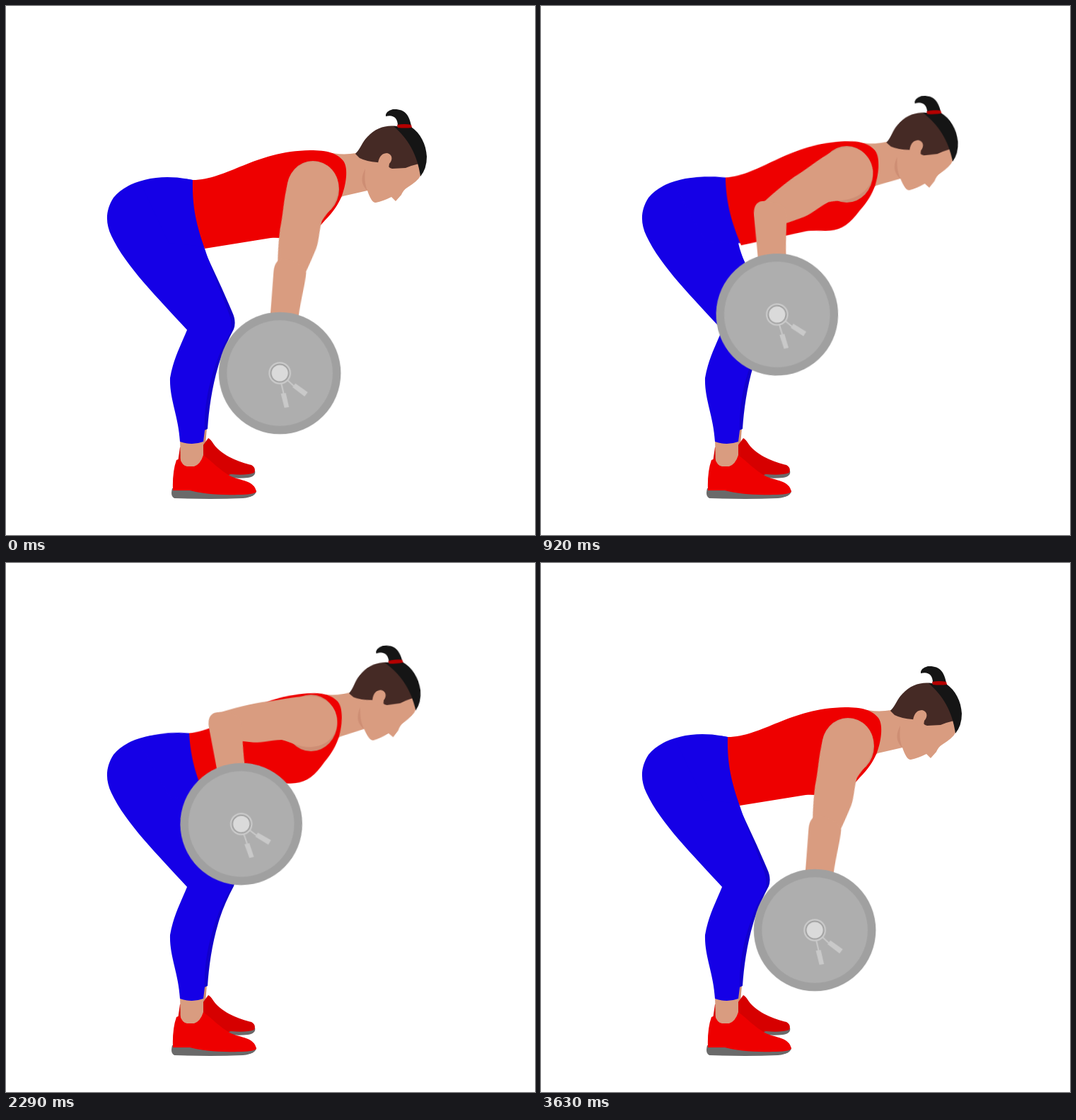
An HTML page for the animation above (3.67 s loop, 748 by 748 pixels).

```html
<!DOCTYPE html>
<html lang="en">
<head>
<meta charset="utf-8">
<title>Bent-over row</title>
<style>
  html, body { margin: 0; width: 100%; height: 100%; overflow: hidden; background: #fff; }
  svg { display: block; width: 100vw; height: 100vh; }

  .skin { fill: #d99c80; }
  .shade { fill: #ce8e74; }
  .red { fill: #ee0000; }
  .darkred { fill: #d60000; }
  .blue { fill: #1500e6; }
  .darkblue { fill: #1200cb; }
  .sole { fill: #6a6a6a; }
  .brown { fill: #452a25; }
  .black { fill: #151515; }
  .clip { fill: #c9c9c9; }
  .rod { fill: none; stroke: #c9c9c9; stroke-width: 2; }

  /* every joint shares one lift-and-lower cycle */
  .joint { animation: row 3670ms infinite; }
  @keyframes row {
    0%, 2.72% { transform: var(--low); animation-timing-function: cubic-bezier(.35, 0, .45, 1); }
    50% { transform: var(--high); animation-timing-function: cubic-bezier(.55, 0, .65, 1); }
    97.28%, 100% { transform: var(--low); }
  }
  .torso { transform-origin: 197px 303px; --low: rotate(0deg); --high: rotate(-5.3deg); }
  .shoulder { --low: translate(434px, 257px); --high: translate(431px, 221px); }
  .upper { --low: rotate(15.8deg); --high: rotate(96deg); }
  .fore { --low: translate(0, 123px) rotate(-10.5deg); --high: translate(0, 123px) rotate(-107.2deg); }
  .plate { --low: translate(0, 144.4px) rotate(-5.3deg); --high: translate(0, 144.4px) rotate(4.7deg); }
</style>
</head>
<body>
<svg viewBox="0 0 748 748">
  <!-- far leg -->
  <path class="shade" d="M276 596H284L282 622H274Z"/>
  <path class="sole" d="M300 660Q330 664 352 657Q354 665 342 667Q325 669 310 666Z"/>
  <path class="darkred" d="M246 624L243 645L290 672L318 662Q340 664 351 660Q354 653 347 649C330 645 306 636 294 620Q289 612 286 611L278 622Z"/>
  <path class="darkblue" d="M279 342C292 371 308 404 320 433Q326 446 322 457C314 472 307 487 302 503C291 538 287 570 285 598L278 601L260 500Z"/>

  <!-- near leg -->
  <path class="skin" d="M246 612H279L279 645Q270 656 247 652Z"/>
  <path class="sole" d="M235 682Q232 693 238 696Q290 698 335 696Q354 694 354 685Z"/>
  <path class="red" d="M241 642L246 640Q249 650 256 651H266Q275 648 279 635C291 644 303 657 318 665C331 671 352 671 354 687Q350 691 328 691C300 692 275 689 260 685H236Q235 659 241 642Z"/>
  <path class="blue" d="M264 246Q246 242 228 242C196 242 166 253 152 271C141 288 140 306 149 325C169 368 215 413 256 458C249 476 236 500 232 526C231 556 244 580 246 616Q263 622 279 616L281 600C280 570 285 540 296 508C304 485 310 474 317 462Q321 452 316 437C306 409 291 375 281 343L270 300Z"/>

  <g class="joint torso">
    <path class="blue" d="M190 250Q225 239 264 246L280 340L230 335Z"/>

    <!-- neck and face -->
    <path class="skin" d="M448 205Q472 212 495 208L530 180L584 220L586 240Q583 247 567 257Q562 260 559 267L551 276L545 270Q533 276 523 278Q517 279 511 261L476 269L462 280L440 230Z"/>
    <path class="shade" d="M508 230C501 243 502 253 511 261C507 251 507 243 508 230Z"/>

    <!-- hair -->
    <path class="brown" d="M494 209C502 201 503 193 511 185C523 172 537 168 553 170L576 196L584 223Q575 225 565 229L546 230Q541 229 540 225L525 221Q510 220 500 215Z"/>
    <path class="black" d="M548 170L573 171C586 180 594 195 595 213Q595 230 586 241C582 210 568 187 548 170Z"/>
    <path class="black" d="M554 169C554 158 547 153 537 156Q536 149 547 146C564 145 570 154 573 169Z"/>
    <path d="M553 168Q563 166 573 168L574 172Q564 173 554 172Z" fill="#b40000"/>
    <path class="skin" d="M526 222C528 211 533 208 539 208C547 210 547 218 542 223L541 229L534 231Z"/>

    <path class="red" d="M264 246C312 246 352 205 430 204C455 204 468 208 477 219C485 230 480 255 475 268C470 281 461 293 451 303C437 320 424 329 408 329C395 329 380 326 368 329L281 343C270 312 263 285 264 246Z"/>
  </g>

  <g class="joint shoulder">
    <ellipse class="shade" cy="2" rx="37" ry="40"/>
    <g class="joint upper">
      <path class="skin" d="M-14 134C-18 120 -25 95 -29 68C-30 48 -36 26 -36 2C-36 -21 -20 -37 0 -37C21 -37 36 -21 36 2C36 18 28 30 25 42C25 60 30 72 27 88Q25 104 23 116L14 136Z"/>
      <g class="joint fore">
        <path class="skin" d="M-22 2C-22 -10 -17 -18 -7 -17C6 -16 23 -10 24 0C24 16 20 38 19 62L18 100H-20L-21 60Z"/>
        <g class="joint plate">
          <circle r="86.3" fill="#a0a0a0"/>
          <circle r="74.8" fill="#aeaeae"/>
          <path class="rod" d="M2 14L5.5 29M11 10L20 18.5"/>
          <path class="clip" d="M1.5 29L8.5 28L13 48L6.5 49ZM22 14.5L39.5 27L35 33L18 20Z"/>
          <circle r="15.8" fill="#cbcbcb"/>
          <circle r="13.6" fill="#a0a0a0"/>
          <circle r="11.6" fill="#dadada"/>
        </g>
      </g>
    </g>
  </g>
</svg>
</body>
</html>
```
